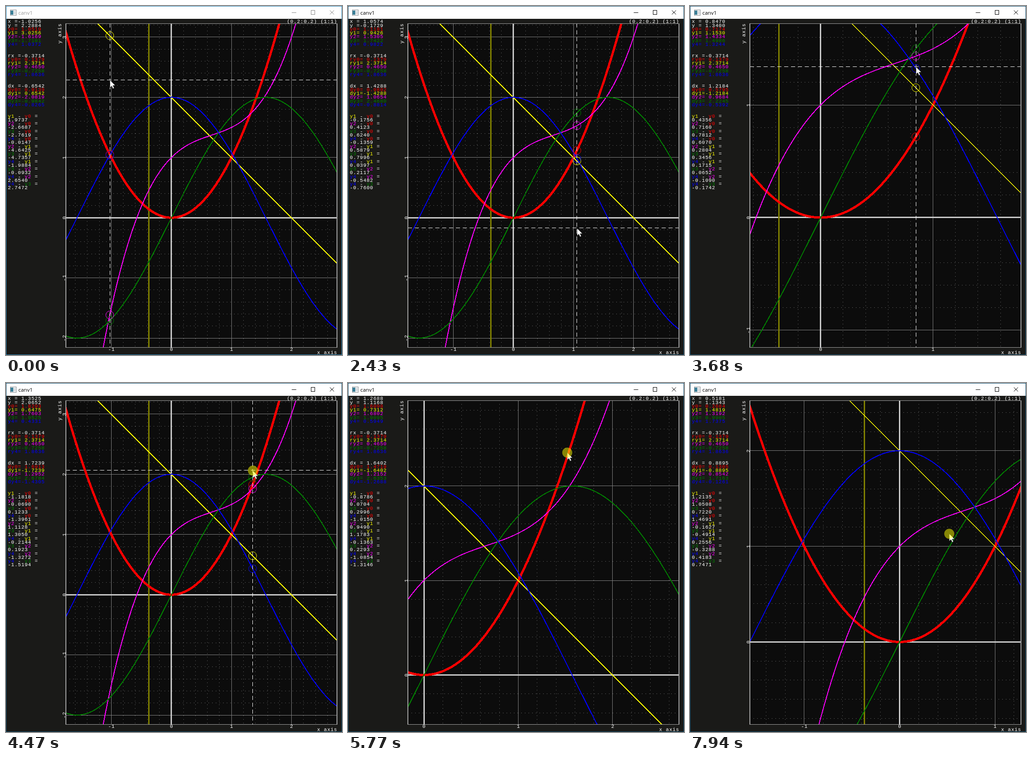
Recreate the animation shown at these times as an HTML page. Size 735 by 762 pixels, loop 7990 ms.

```html
<!DOCTYPE html>
<html lang="en">
<head>
<meta charset="utf-8">
<title>canv1</title>
<style>
  html, body { margin: 0; width: 100%; height: 100%; overflow: hidden; background: #1a1a18; }
  svg { display: block; width: 735px; height: 762px; }
  .mono { font: 11px "Liberation Mono", monospace; letter-spacing: .75px; white-space: pre; fill: #fff; }
  .crisp { shape-rendering: crispEdges; fill: none; }
</style>
</head>
<body>
<svg viewBox="0 0 735 762">
  <defs><clipPath id="plot"><rect x="131" y="38" width="593" height="708"/></clipPath></defs>
  <rect width="735" height="762" fill="#1a1a18"/>
  <rect width="735" height="28" fill="#fff"/>
  <g class="crisp">
    <rect x="9" y="8" width="13" height="12" fill="#f4f4f4" stroke="#8a8f94"/>
    <rect x="10" y="10" width="6" height="9" fill="#3b7f97"/>
    <rect x="17" y="11" width="4" height="7" fill="#d5dade"/>
  </g>
  <text id="title" x="27" y="18.5" font-family="Open Sans, sans-serif" font-size="11.5">canv1</text>
  <g id="buttons" fill="none">
    <path class="crisp" d="M625 14.5h10M667.5 9.5h8v9h-8z"/>
    <path d="M708.5 9.5l9 9m0-9l-9 9"/>
  </g>
  <rect x="131" y="38" width="593" height="708" fill="#0c0c0c"/>
  <g clip-path="url(#plot)">
    <path id="minor" class="crisp" stroke="#8c8c8c" stroke-dasharray="1 7"/>
    <path id="major" class="crisp" stroke="#808080"/>
    <path id="axes" class="crisp" stroke="#c8c8c8" stroke-width="3"/>
    <path id="ref" class="crisp" stroke="#808000" stroke-width="3"/>
    <g id="curves"></g>
    <g id="probe">
      <path id="cross" class="crisp" stroke="#fff" stroke-dasharray="9 6"/>
      <g id="rings"></g>
    </g>
    <path id="band" class="crisp" stroke="#fff" stroke-dasharray="9 6"/>
  </g>
  <rect x="131" y="38.5" width="593" height="707" class="crisp" stroke="#a0a0a0" stroke-width="1.5"/>
  <g id="ticks" class="mono" text-anchor="middle"></g>
  <g class="mono">
    <text x="724.7" y="37.3" text-anchor="end">(0.2:0.2) (1:1)</text>
    <text x="724.7" y="760" text-anchor="end">x axis</text>
    <text transform="translate(121 82) rotate(-90)">y axis</text>
  </g>
  <g id="panel" class="mono"></g>
  <rect id="frame" x=".5" y=".5" width="734" height="761" class="crisp"/>
  <g id="pointer">
    <path d="M0 0v16l3.7-3.4 2.6 5.9 2.7-1.2-2.6-5.7h5.1z" fill="#fff" stroke="#111" stroke-width=".6"/>
    <circle id="disc" r="11" fill="#ff0" opacity=".5"/>
  </g>
</svg>
<script>
const LOOP = 7990, L = 131, R = 724, T = 38, B = 746, REF = -0.3714;
const home = { s: 131.4, x: 361.8, y: 462.2 };
const colors = ['#f00', '#ff0', '#f0f', '#008000', '#00f'];
const fns = [
  x => x * x,
  x => 2 - x,
  x => 1 + x - x * x + x * x * x / 2,
  x => 2 * Math.sin(x),
  x => 2 * Math.cos(x)
];

// Pointer path: time, x, y
const path = [
  [0, 227.036, 161.504], [370, 227.036, 161.504], [1430, 635, 508], [2030, 635, 508],
  [2430, 501.031, 484.985], [2680, 449.72, 465.748], [2800, 449.72, 465.748], [2880, 449.1, 462.5],
  [3220, 482, 161], [3480, 486, 122], [3560, 486, 122], [3910, 515, 160], [4030, 515, 160],
  [4290, 539.519, 190.833], [4600, 539.519, 190.833], [4900, 439, 282.383], [4930, 439, 282.383],
  [5160, 428.001, 407.003], [5390, 428.001, 407.003], [5770, 479, 152], [5900, 480, 145.2],
  [5980, 480, 145.2], [6590, 612, 352], [6740, 618, 364], [6970, 620.414, 369.439],
  [7400, 271.337, 403.351], [7460, 271.337, 403.351], [7940, 566.1, 328.8], [7990, 572, 328]
];

const actions = [
  { kind: 'box', press: 230, start: 410, up: 1660, end: 2070 },
  { kind: 'zoom', press: 2800, start: 2880, up: 3560, end: 3560, gain: .00184 },
  { kind: 'reset', press: 3910, start: 3910, up: 3910, end: 3910 },
  { kind: 'pan', press: 4470, start: 4600, up: 4930, end: 4930 },
  { kind: 'zoom', press: 5160, start: 5390, up: 5980, end: 5980, gain: .001767 },
  { kind: 'pan', press: 7400, start: 7460, up: 8000, end: 8000 }
];

const $ = id => document.getElementById(id);
const set = (el, attrs) => { for (const k in attrs) el.setAttribute(k, attrs[k]); return el; };
const add = (parent, tag, attrs) =>
  parent.appendChild(set(document.createElementNS('http://www.w3.org/2000/svg', tag), attrs));
const show = (el, on) => set(el, { visibility: on ? 'visible' : 'hidden' });
const half = v => Math.floor(v) + .5;
const vline = x => `M${x} ${T}V${B}`;
const hline = y => `M${L} ${y}H${R}`;
const num = v => (v < 0 ? '-' : ' ') + Math.abs(v).toFixed(4);

// Hermite interpolation that comes to rest at pauses
function slope(i, c) {
  const a = path[i - 1], p = path[i], b = path[i + 1];
  if (!a || !b || a[c] === p[c] || b[c] === p[c]) return 0;
  return (b[c] - a[c]) / (b[0] - a[0]);
}
function mouse(t) {
  let i = 0;
  while (i < path.length - 2 && path[i + 1][0] <= t) i++;
  const a = path[i], b = path[i + 1], d = b[0] - a[0];
  const u = Math.min(1, (t - a[0]) / d), e = u * u * (3 - 2 * u);
  const at = c => a[c] + (b[c] - a[c]) * e +
    d * u * (1 - u) * ((1 - u) * slope(i, c) - u * slope(i + 1, c));
  return { x: at(1), y: at(2) };
}

function scaleAt(v, p, q, to = p) {
  return { s: v.s * q, x: to.x + (v.x - p.x) * q, y: to.y + (v.y - p.y) * q };
}
function apply(a, v, t) {
  if (a.kind === 'reset') return home;
  const from = mouse(a.start), to = mouse(Math.min(t, a.up));
  if (a.kind === 'zoom') return scaleAt(v, from, Math.exp(a.gain * (from.y - to.y)));
  if (a.kind === 'pan') return { s: v.s, x: v.x + to.x - from.x, y: v.y + to.y - from.y };
  if (t < a.up) return v;
  if (t >= a.end) return home;
  const q = Math.min((R - L) / (to.x - from.x), (B - T) / (to.y - from.y));
  const mid = { x: (from.x + to.x) / 2, y: (from.y + to.y) / 2 };
  return scaleAt(v, mid, q, { x: (L + R) / 2, y: (T + B) / 2 });
}
const toData = (p, v) => ({ x: (p.x - v.x) / v.s, y: (v.y - p.y) / v.s });

function state(t) {
  let view = home, held = null, point = null;
  for (const a of actions) {
    if (t < a.press) break;
    if (t < a.end) { held = a; point = toData(mouse(a.press), view); }
    if (t >= a.start) view = apply(a, view, t);
  }
  return { view, held, point: point || toData(mouse(t), view) };
}

// Side panel
const panel = $('panel');
const row = (i, fill = '#fff') => add(panel, 'text', { x: 4, y: 37.3 + 8.25 * i, fill });
const block = (i, n) => Array.from({ length: n }, (_, k) => row(i + k, colors[k - n + 5]));
const nowRows = block(0, 7), refRows = block(9, 6), deltaRows = block(17, 6);
const diffs = [];
for (let j = 0; j < 4; j++) {
  for (let i = j + 1; i < 5; i++) {
    const at = 25 + 2 * diffs.length, head = row(at);
    [['y' + i, colors[i]], [' - ', '#fff'], ['y' + j, colors[j]], [' =', '#fff']]
      .forEach(([s, fill]) => add(head, 'tspan', { fill }).textContent = s);
    diffs.push({ i, j, out: row(at + 1) });
  }
}
const put = (rows, labels, values) =>
  rows.forEach((r, k) => r.textContent = labels[k] + '=' + num(values[k]));
const names = p => colors.map((_, i) => p + i);
const refValues = fns.map(f => f(REF));

function drawPanel(p) {
  const ys = fns.map(f => f(p.x));
  put(nowRows, ['x ', 'y ', ...names('y')], [p.x, p.y, ...ys]);
  put(refRows, ['rx ', ...names('ry')], [REF, ...refValues]);
  put(deltaRows, ['dx ', ...names('dy')], [p.x - REF, ...ys.map((y, i) => y - refValues[i])]);
  for (const d of diffs) d.out.textContent = num(ys[d.i] - ys[d.j]);
}

const curves = fns.map((_, i) => add($('curves'), 'path',
  { class: 'crisp', stroke: colors[i], 'stroke-width': i ? 2 : 5, 'stroke-linejoin': 'round' }));
const rings = fns.map((_, i) => add($('rings'), 'circle', { r: 8.7, fill: 'none', stroke: colors[i] }));

function drawPlot(v) {
  let minor = '', major = '', ticks = '';
  const lines = (lo, hi, pos, line, label) => {
    for (let k = Math.ceil(lo * 5); k <= hi * 5; k++) {
      const p = pos(k / 5);
      if (k % 5) { minor += line(half(p)); continue; }
      major += line(half(p));
      ticks += label(p, k / 5);
    }
  };
  lines((L - v.x) / v.s, (R - v.x) / v.s, x => v.x + x * v.s, vline,
    (p, n) => `<text x="${p + .4}" y="753">${n}</text>`);
  lines((v.y - B) / v.s, (v.y - T) / v.s, y => v.y - y * v.s, hline,
    (p, n) => `<text transform="translate(130.5 ${p}) rotate(-90)">${n}</text>`);
  set($('minor'), { d: minor });
  set($('major'), { d: major });
  $('ticks').innerHTML = ticks;
  set($('axes'), { d: vline(half(v.x)) + hline(half(v.y)) });
  set($('ref'), { d: vline(half(v.x + REF * v.s)) });
  fns.forEach((f, i) => {
    let d = '';
    for (let x = L - 2; x <= R + 2; x += 3) {
      d += (d ? 'L' : 'M') + x + ' ' + (v.y - f((x - v.x) / v.s) * v.s).toFixed(1);
    }
    set(curves[i], { d });
  });
}

function draw(t) {
  const { view: v, held, point: p } = state(t), m = mouse(t);
  const active = t >= 230, dragging = held && t >= held.start;
  drawPlot(v);
  drawPanel(p);

  show($('probe'), !dragging);
  const px = v.x + p.x * v.s, py = v.y - p.y * v.s;
  set($('cross'), { d: vline(half(px)) + hline(half(py)) });
  rings.forEach((r, i) => set(r, { cx: px, cy: v.y - fns[i](p.x) * v.s }));

  const boxing = dragging && held.kind === 'box' && t < held.up;
  show($('band'), boxing);
  if (boxing) {
    const a = mouse(held.start);
    set($('band'), { d: `M${half(a.x)} ${half(a.y)}H${half(m.x)}V${half(m.y)}H${half(a.x)}Z` });
  }

  set($('pointer'), { transform: `translate(${m.x + .5} ${m.y + .5})` });
  show($('disc'), held && t < held.up);
  set($('title'), { fill: active ? '#000' : '#999' });
  set($('buttons'), { stroke: active ? '#000' : '#888' });
  set($('frame'), { stroke: active ? '#0f4c6c' : '#2b86b8' });
}

const begin = performance.now();
function tick() {
  draw((performance.now() - begin) % LOOP);
  requestAnimationFrame(tick);
}
tick();
</script>
</body>
</html>
```
